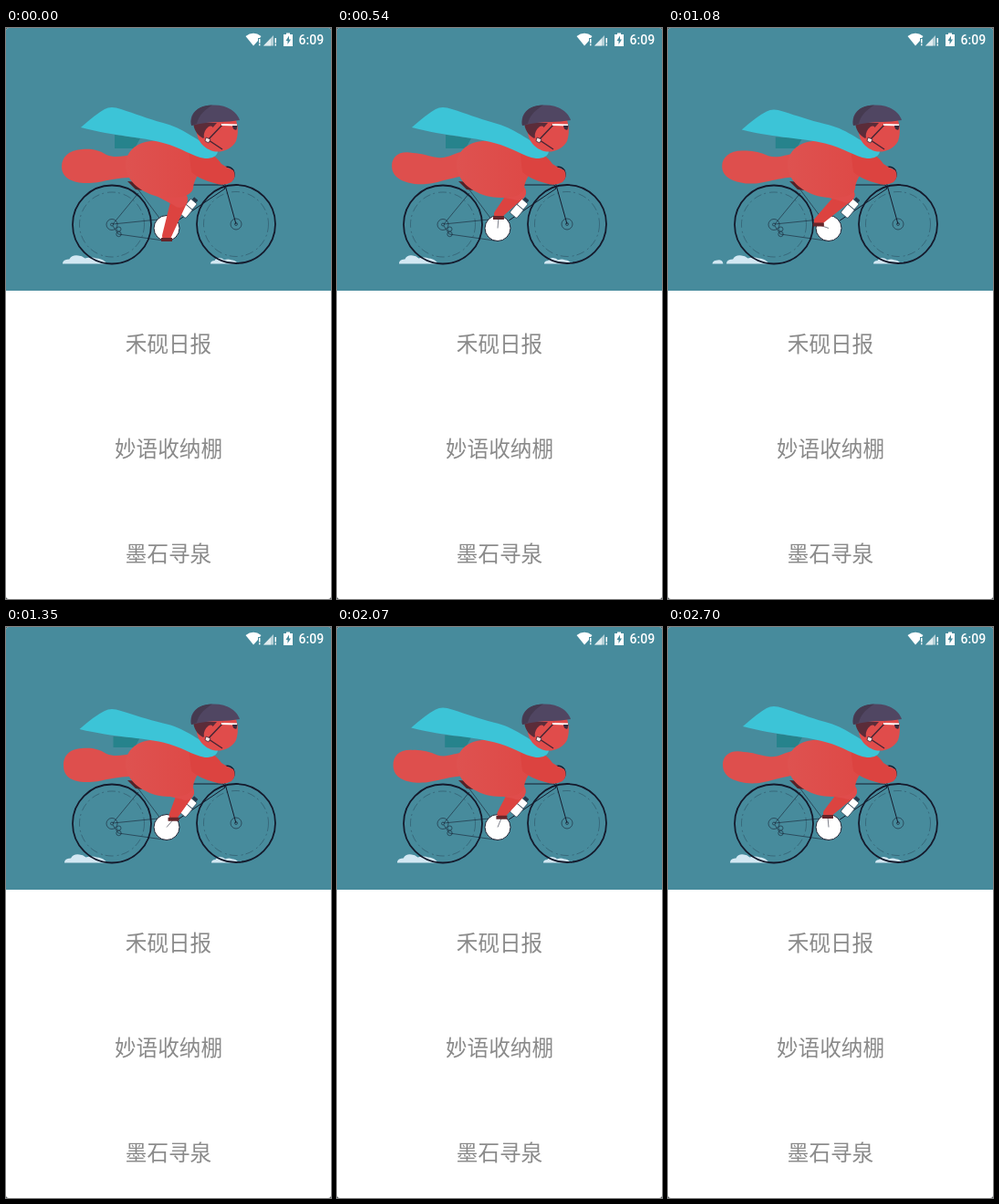
An HTML page for the animation above (2730 ms loop, 356x626 px).

```html
<!DOCTYPE html>
<html lang="zh">
<head>
<meta charset="utf-8">
<style>
html, body { margin: 0; width: 100%; height: 100%; overflow: hidden; background: #4a4e50; }
svg { display: block; width: 100vw; height: 100vh; }
.menu { font: 23.6px "Noto Sans CJK SC", "Noto Sans CJK", sans-serif; fill: #8a8a8a; text-anchor: middle; }
.clock { font: 500 14px Roboto, sans-serif; fill: #fff; }
.line { fill: none; stroke: #141a2c; stroke-width: 1; }
.thin { stroke-width: .7; opacity: .8; }
.red { fill: #e04c4b; }
.deep { fill: #dc4340; }
.dust { fill: #d3e8f3; }
</style>
</head>
<body>
<svg viewBox="0 0 356 626">
  <defs>
    <clipPath id="screen"><rect width="356" height="626" rx="3"/></clipPath>
    <linearGradient id="fur" x1="0" x2="1">
      <stop offset="0" stop-color="#de5250"/><stop offset="1" stop-color="#de4845"/>
    </linearGradient>
  </defs>
  <g clip-path="url(#screen)">
    <rect width="356" height="626" fill="#fff"/>
    <rect width="356" height="288" fill="#478b9c"/>

    <g fill="#fff">
      <path d="M262.5 9Q271 2.500 279.500 9L278 11H276V14L271 19.500Z"/>
      <path d="M277 12h1.500v4.500h-1.500zM277 17.500h1.500v1.700h-1.500z"/>
      <path d="M282 19.500L293 8V19.500Z" opacity=".6"/>
      <path d="M282 19.500L290 11.500V19.500Z" opacity=".6"/>
      <path d="M294.500 11h1.500v5.500h-1.500zM294.500 17.500h1.500v2h-1.500z"/>
      <path d="M307 5.500h4v1.500h3v13h-10v-13h3z"/>
    </g>
    <path d="M310 8.500L306.500 14H308.500V18L312 12.500H310Z" fill="#478b9c"/>
    <text class="clock" x="320.500" y="18">6:09</text>

    <path id="dustFront" class="dust"/>
    <path id="dustRear" class="dust"/>
    <path id="puff" class="dust"/>

    <path id="patch" fill="#26838c"/>
    <path id="tail" fill="#de4f4d"/>

    <g id="wheels"></g>
    <g class="line">
      <path class="thin" d="M117 215L145 181M141 172L176 219M117 215L176 209M117 217L123 226L176 233.500"/>
      <path d="M138 172H238L240 176L178 218"/>
      <path d="M238 165L252 215"/>
      <path d="M234 155Q244 149 249 156Q252 163 246 168" stroke-width="1.600"/>
      <g class="thin"><circle cx="123.500" cy="220.500" r="2.500"/><circle cx="123.500" cy="226" r="2.700"/></g>
    </g>
    <path d="M133 168L146 169L149 178L142 177Z" fill="#542127"/>
    <circle cx="176" cy="219.500" r="14" fill="#fff" stroke="#1d2233"/>
    <path id="crank" class="line thin"/>
    <g transform="translate(200 197) rotate(40)" fill="#fff" stroke="#26384a" stroke-width=".7">
      <rect x="-5" y="-1" width="10" height="12" rx="1.500"/>
      <rect x="-4.500" y="-9" width="9" height="8" rx="1"/>
      <path d="M-2.500 -12.500h5v3h-5z" fill="#26384a"/>
    </g>

    <path id="shank" class="deep"/>
    <path id="shoe" fill="#65262b"/>
    <path id="thigh" class="red"/>
    <path d="M131 151C131 132 148 122 169 124C190 126 206 129 216 139C224 150 206 160 205 176C202 187 182 187 168 185C149 181 132 169 131 151Z" fill="url(#fur)"/>
    <path d="M200 132C220 133 231 141 236 149Q243 154 249 156Q253 163 247 169Q238 174 228 170Q212 166 203 158Z" class="deep"/>
    <path id="cape" fill="#3cc4d7"/>

    <path d="M211 104C205 116 213 129 222 133C232 139 247 134 252 124C255 115 254 108 252 101Z" class="red"/>
    <path d="M205 104L231 104L216 121C209 117 206 112 205 104Z" fill="#5b2c39"/>
    <ellipse cx="222" cy="115" rx="4.500" ry="8" class="red" transform="rotate(25 222 115)"/>
    <path d="M238 105L220 124M219 121L237 133" fill="none" stroke="#472634" stroke-width="1.500"/>
    <path d="M219 120l5 2l-2 4l-4 -2z" fill="#f2e6e6" stroke="#472634" stroke-width=".8"/>
    <path d="M236 106L253 106.500" stroke="#fff" stroke-width="2"/>
    <path d="M248 107h5.500l-1 4.500q-4 1 -4.500 -4.500z" fill="#3c2c3c"/>
    <path d="M203 107C200 94 210 85 226 84.500C243 84 253 92 256 101Q245 103 235 103Q219 103 203 107Z" fill="#504662"/>
    <path d="M204 97C208 87 216 85 226 84.500C219 89 211 95 209 105L203 107Q202 102 204 97Z" fill="#453a50"/>

    <text class="menu" x="178" y="355">禾砚日报</text>
    <text class="menu" x="178" y="470">妙语收纳棚</text>
    <text class="menu" x="178" y="585">墨石寻泉</text>
  </g>
</svg>
<script>
const LOOP = 2730, TURN = 750;
const $ = id => document.getElementById(id);
const draw = (id, d) => $(id).setAttribute('d', d);

// ms in the turn, crank degrees, tail tip x, tail wave, dust x, cape drop
const keys = [
  [0, 180, 61, 0, 62, 0],
  [120, 190, 61, 0, 62, 0],
  [300, 275, 59, .25, 63, 3],
  [450, 355, 60, 1, 68, 0],
  [540, 364, 60, 1, 68, 0],
  [600, 398, 63, 0, 64, 3],
  [750, 540, 61, 0, 62, 0]
];

function pose(ms) {
  const i = keys.findIndex(k => k[0] > ms), a = keys[i - 1], b = keys[i];
  const f = (ms - a[0]) / (b[0] - a[0]);
  return a.map((v, n) => v + (b[n] - v) * f);
}

// Rounded limb that narrows from radius r to radius s
function limb([ax, ay], [bx, by], r, s) {
  const d = Math.hypot(bx - ax, by - ay), nx = (ay - by) / d, ny = (bx - ax) / d;
  return `M${ax + nx * r} ${ay + ny * r}A${r} ${r} 0 0 1 ${ax - nx * r} ${ay - ny * r}` +
    `L${bx - nx * s} ${by - ny * s}A${s} ${s} 0 0 1 ${bx + nx * s} ${by + ny * s}Z`;
}

const cloud = (x, w, h) => `M${x} 258.500q0 ${-5 * h} ${w * .15} ${-5 * h}` +
  `q${w * .06} ${-5 * h} ${w * .2} ${-4 * h}q${w * .08} 0 ${w * .15} ${3 * h}` +
  `q${w * .15} ${-2 * h} ${w * .25} 0q${w * .15} 0 ${w * .25} ${6 * h}z`;

function wheel(x, y) {
  return `<g class="line"><circle cx="${x}" cy="${y}" r="43" stroke-width="1.800"/>
    <circle cx="${x}" cy="${y}" r="35.500" stroke-width=".5" stroke-dasharray="9 3 2 4" opacity=".6"/>
    <circle class="thin" cx="${x}" cy="${y}" r="6"/><circle class="thin" cx="${x}" cy="${y}" r="1.500"/></g>`;
}
$('wheels').innerHTML = wheel(116, 215.5) + wheel(252, 215);

function render(t) {
  const ms = t % TURN;
  const [, deg, tip, w, dust, drop] = pose(ms);
  const a = deg * Math.PI / 180, c = Math.cos(a);
  const px = 176 + 12 * Math.sin(a), py = 220 - 12 * c;
  const knee = [194 + 4 * c, 184 - 4 * c];

  draw('thigh', limb([167, 163], knee, 21, 9));
  draw('shank', limb(knee, [px, py - 4], 9, 5));
  draw('shoe', `M${px - 6} ${py - 2}h12v4h-12z`);
  draw('crank', `M176 219.500L${px} ${py}`);

  draw('tail', `M140 ${139 - 4 * w}C128 ${140 - 3 * w} 120 ${143 + w} 110 ${139 + 3 * w}` +
    `C101 ${133 + 8 * w} 92 ${132 + 5 * w} 83 ${133 + 4 * w}` +
    `C68 134 ${tip} ${142 - w} ${tip} ${152 - w}` +
    `C${tip} 164 72 169 85 ${170 + w}C105 ${171 + 2 * w} 112 ${164 + 3 * w} 140 ${164 - 2 * w}Z`);

  const y = drop, x = 82 - drop / 2;
  draw('cape', `M${x} ${109 + y}Q${x + 17} ${94 + y} 108 ${89 + y}Q115 ${85 + y} 126 ${89 + y}` +
    `C142 ${94 + y} 154 ${99 + y * .7} 172 ${104 + y * .5}C195 110 207 122 232 135Q231 143 218 143` +
    `C204 141 192 131 172 ${126 + y * .2}C148 ${119 + y * .6} 120 ${119 + y * .8} ${x} ${109 + y}Z`);
  draw('patch', `M${119 - y / 2} ${117 + y}L147 121L141 132H${119 - y / 2}Z`);

  draw('dustRear', cloud(dust, 111 - dust, 1));
  draw('dustFront', cloud(224 + (dust - 62) * .5, 30, .7));
  const p = (ms - 180) / 240, on = p > 0 && p < 1;
  draw('puff', on ? `M${56 - 12 * p} 258.500q1 -${6 - 3 * p} 6 -4q5 -1 6 4z` : '');
}

const start = performance.now();
function tick() {
  render((performance.now() - start) % LOOP);
  requestAnimationFrame(tick);
}
render(0);
requestAnimationFrame(tick);
</script>
</body>
</html>
```
